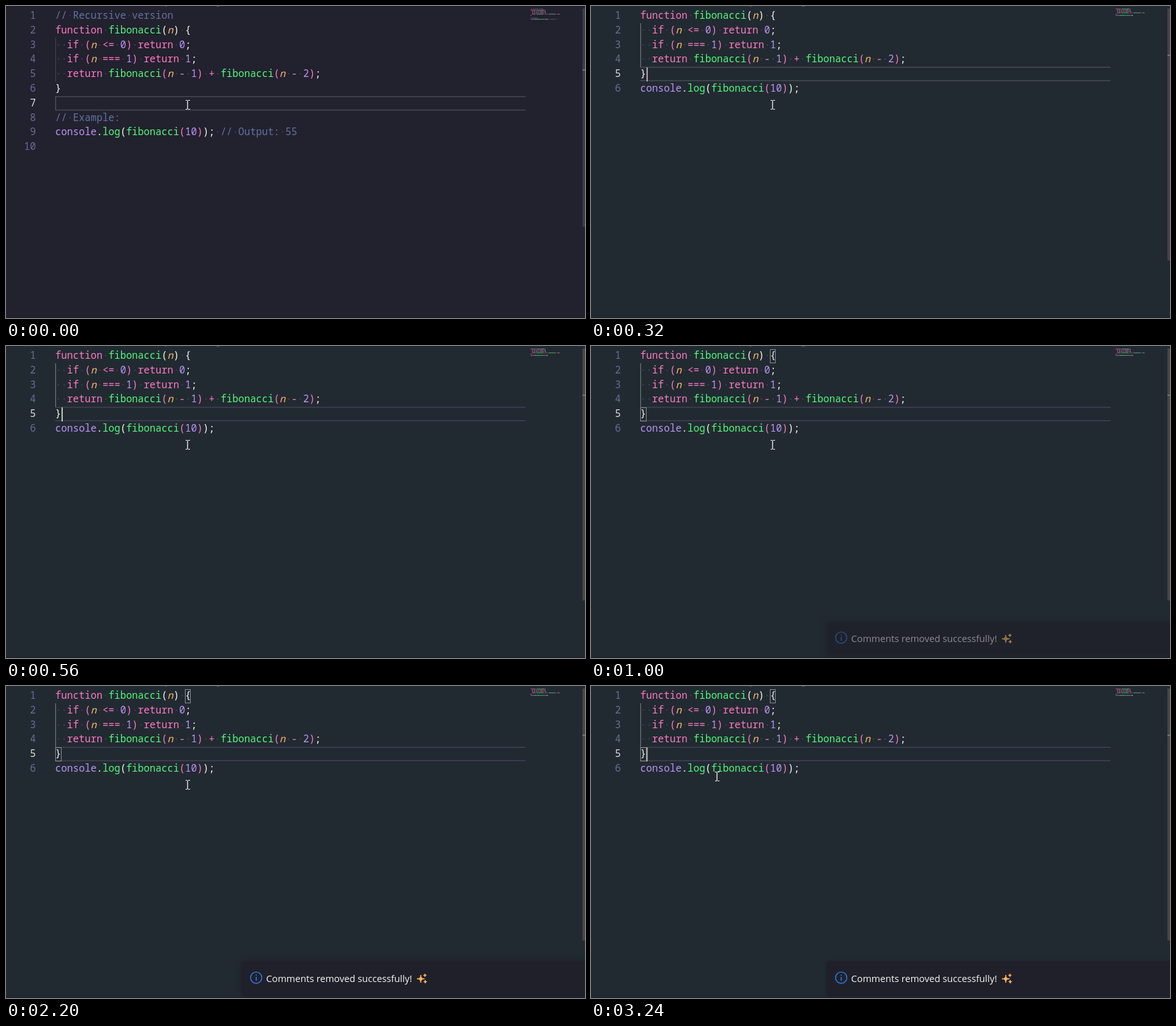
Recreate the animation shown at these times as an HTML page with a canvas. Size 906 by 488 pixels, loop 3600 ms.

```html
<!DOCTYPE html>
<html lang="en">
<head>
<meta charset="utf-8">
<title>Comment remover</title>
<style>
  html, body { margin: 0; width: 100%; height: 100%; overflow: hidden; background: #22212e; }
  canvas { display: block; }
</style>
</head>
<body>
<canvas id="stage" width="906" height="488"></canvas>
<script>
const ctx = document.getElementById('stage').getContext('2d');
const LOOP = 3600, LEFT = 77, COL = 9.24, ROW = 22.8, TOP = 4;
const MONO = '15.4px "Noto Sans Mono", monospace';
const PINK = '#ff79c6', GREEN = '#50fa7b', PURPLE = '#bd93f9',
      ORANGE = '#ffb86c', WHITE = '#f8f8f2', COMMENT = '#6272a4';

const body = [
  'function fibonacci(n) {',
  '  if (n <= 0) return 0;',
  '  if (n === 1) return 1;',
  '  return fibonacci(n - 1) + fibonacci(n - 2);',
  '}'
];
const call = 'console.log(fibonacci(10));';
const before = highlight(['// Recursive version', ...body, '', '// Example:', call + ' // Output: 55', '']);
const after = highlight([...body, call]);

// Turns each line into a list of { text, col, color }.
function highlight(lines) {
  let depth = 0;
  return lines.map(line =>
    [...line.matchAll(/\/\/.*|\w+|[<=]+|\S/g)].map(m => {
      const text = m[0];
      let color = WHITE;
      if (text.startsWith('//')) color = COMMENT;
      else if (/^(function|if|return|[<=+-]+)$/.test(text)) color = PINK;
      else if (/^(fibonacci|log)$/.test(text)) color = GREEN;
      else if (/^(\d+|console)$/.test(text)) color = PURPLE;
      else if (text === 'n') color = ORANGE;
      else if (/[({]/.test(text)) color = depth++ ? PINK : WHITE;
      else if (/[)}]/.test(text)) color = --depth ? PINK : WHITE;
      return { text, col: m.index, color };
    }));
}

function rect(x, y, w, h, color) {
  ctx.fillStyle = color;
  ctx.fillRect(x, y, w, h);
}

// Places characters on the editor's fixed grid.
function gridText(text, x, y, color, italic) {
  ctx.font = (italic ? 'italic ' : '') + MONO;
  ctx.fillStyle = color;
  [...text].forEach((c, i) => ctx.fillText(c, x + i * COL, y));
}

function drawCode(lines, active) {
  lines.forEach((tokens, row) => {
    const y = Math.round(20 + row * ROW), label = String(row + 1);
    gridText(label, 46.8 - label.length * COL, y, row === active ? '#dcdde8' : '#626f9c');
    let end = 0;
    const dots = (from, to) => {
      for (let c = from; c < to; c++) rect(LEFT + c * COL + 4, y - 6, 1.6, 1.6, '#4a4c5f');
    };
    for (const { text, col, color } of tokens) {
      dots(end, col);
      gridText(text, LEFT + col * COL, y, color, text === 'n');
      if (color === COMMENT) {
        [...text].forEach((c, i) => c === ' ' && dots(col + i, col + i + 1));
      }
      end = col + text.length;
    }
  });
}

function drawMinimap(lines) {
  ctx.globalAlpha = 0.5;
  lines.forEach((tokens, row) => {
    for (const { text, col, color } of tokens) {
      [...text].forEach((c, i) => c !== ' ' && rect(821 + col + i, TOP + row * 2, 1, 1.3, color));
    }
  });
  ctx.globalAlpha = 1;
}

function drawPointer(x, y) {
  rect(x - 0.5, y - 6, 1.3, 13, WHITE);
  for (const dy of [-7, 7]) {
    rect(x - 3, y + dy, 3, 1, WHITE);
    rect(x + 1, y + dy, 3, 1, WHITE);
  }
}

function star(x, y, r) {
  ctx.beginPath();
  ctx.moveTo(x, y - r);
  for (const [dx, dy] of [[1, 0], [0, 1], [-1, 0], [0, -1]]) {
    ctx.quadraticCurveTo(x, y, x + dx * r, y + dy * r);
  }
  ctx.lineWidth = 1;
  ctx.strokeStyle = ctx.fillStyle = '#ffb45c';
  ctx.fill();
  ctx.stroke();
}

function drawToast(t) {
  ctx.globalAlpha = t < 1040 ? 0.5 : 1;
  ctx.save();
  ctx.shadowColor = '#1c1d26';
  ctx.shadowBlur = t < 2360 ? 8 : 4;
  ctx.fillStyle = '#20202b';
  ctx.beginPath();
  ctx.roundRect(369, 431, 545, 54, 4);
  ctx.fill();
  ctx.restore();

  ctx.strokeStyle = '#3080f0';
  ctx.lineWidth = 1.4;
  ctx.beginPath();
  ctx.arc(391.5, 456.2, 8.8, 0, Math.PI * 2);
  ctx.stroke();
  rect(390.8, 451.5, 1.5, 1.6, '#3080f0');
  rect(390.8, 455, 1.5, 6, '#3080f0');

  ctx.font = '14.7px "Open Sans", sans-serif';
  ctx.fillStyle = WHITE;
  ctx.fillText('Comments removed successfully!', 407, 463);
  star(649, 458, 6);
  star(655.5, 452.5, 2.5);
  star(656, 462.5, 2.5);
  ctx.globalAlpha = 1;
}

function draw(t) {
  const done = t >= 40, settled = t >= 400, notified = t >= 1000;
  const lines = done ? after : before, active = done ? 4 : 6;
  const lineTop = Math.round(TOP + active * ROW);

  rect(0, 0, 906, 488, done ? '#222a31' : '#22212e');
  rect(0, 486, 906, 2, done ? '#1f242c' : '#1e1d28');
  rect(249, 0, 2, 1, '#55586a');
  rect(330, 0, 4, 1, '#55586a');

  const border = !done ? '#464552' : t < 560 ? '#474a55' : '#443f58';
  rect(LEFT, lineTop, 736, 1.5, border);
  rect(LEFT, lineTop + 21, 736, 1.5, border);
  if (!done) rect(LEFT, lineTop, 1.3, 22, '#555461');

  const guideTop = Math.round(TOP + (done ? 1 : 2) * ROW);
  rect(LEFT, guideTop, 1.2, 3 * ROW, done ? '#70767e' : '#41414f');
  drawCode(lines, active);

  if (notified) {
    ctx.strokeStyle = '#878b90';
    ctx.lineWidth = 1;
    ctx.strokeRect(77.5, 96.5, 9, 21);
    ctx.strokeRect(280.5, 5.5, 8, 21);
  }
  const caretOn = done && !(t >= 1000 && t < 1320) && !(t >= 2200 && t < 2720);
  if (caretOn) rect(87, 96, 1.6, 22, !settled ? '#e6bcd2' : notified ? '#b5b6b2' : '#e8e8dc');

  drawMinimap(lines);
  rect(902, TOP, 4, done ? 394 : 341, !done ? '#3d3c49' : settled ? '#4b4546' : '#4b3e50');
  rect(902, done ? 76 : 99, 4, 2, '#74747c');

  if (notified) drawToast(t);
  const move = t < 3200 ? 0 : t < 3240 ? 0.5 : 1;
  drawPointer(284 - 87 * move, Math.round(154 - 13 * move));
}

function tick() {
  draw(performance.now() % LOOP);
  requestAnimationFrame(tick);
}
tick();
</script>
</body>
</html>
```
